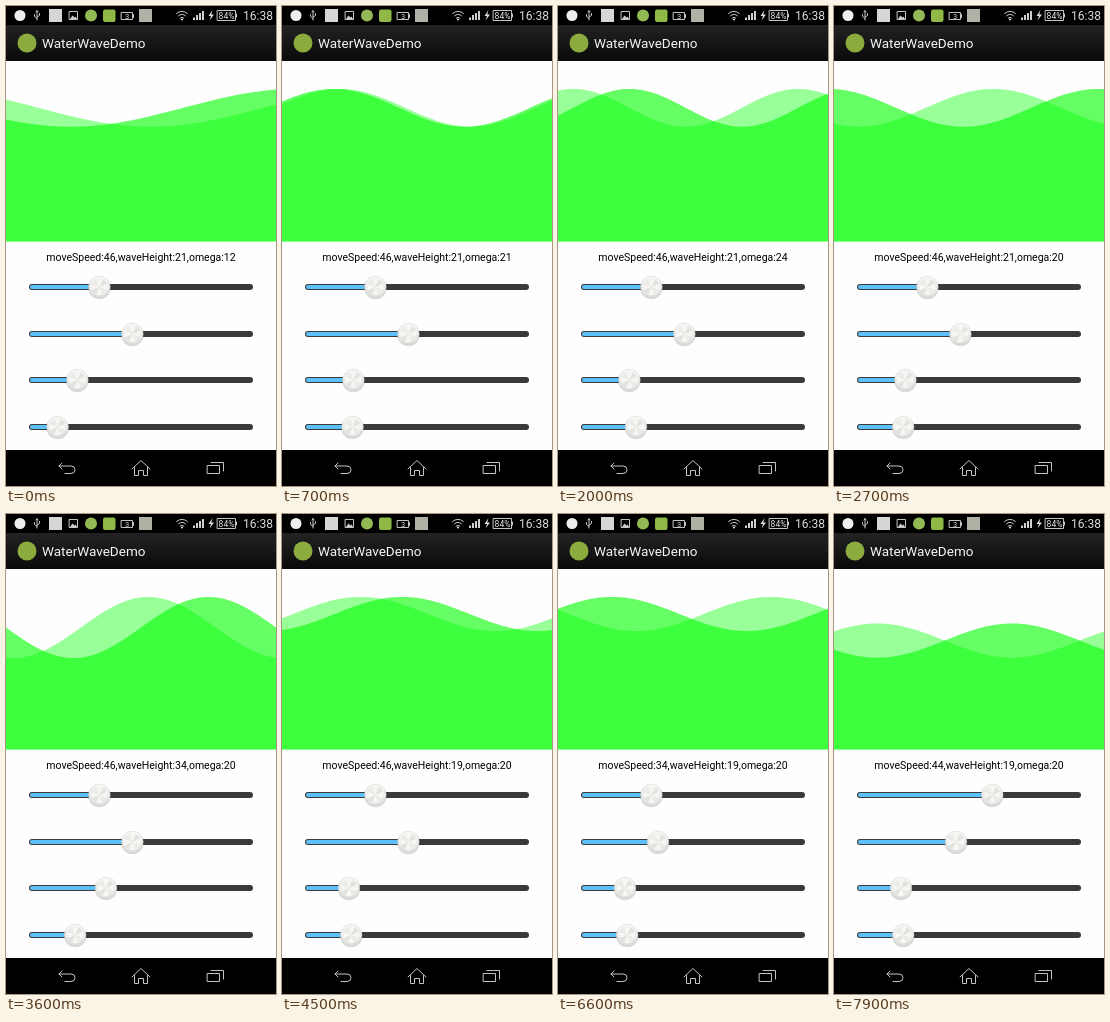
An HTML page for the animation above (8000 ms loop, 270 px wide and 480 px high).

```html
<!DOCTYPE html>
<html lang="en">
<head>
<meta charset="utf-8">
<title>Water wave</title>
<style>
  html, body { margin: 0; width: 100%; height: 100%; overflow: hidden; background: #fefefe; }
  svg { display: block; width: 270px; height: 480px; font-family: Roboto, sans-serif; }
  .line { fill: none; stroke: #c4c4c4; stroke-width: 1; stroke-linejoin: round; stroke-linecap: round; }
</style>
</head>
<body>
<svg viewBox="0 0 270 480" xmlns="http://www.w3.org/2000/svg">
  <defs>
    <linearGradient id="bar" x2="0" y2="1">
      <stop stop-color="#222"/><stop offset="1" stop-color="#0a0a0a"/>
    </linearGradient>
    <linearGradient id="metal" x2="0" y2="1">
      <stop stop-color="#f9f9f8"/><stop offset="1" stop-color="#dcdcda"/>
    </linearGradient>
    <g id="thumb">
      <circle cy="1" r="11.2" fill="#000" opacity=".14"/>
      <circle r="10.8" fill="url(#metal)" stroke="#cfcfcc" stroke-width=".5"/>
      <circle r="8.4" fill="#ebebe8"/>
      <path d="M0 0L-3 -8L3 -8ZM0 0L-3 8L3 8ZM0 0L8 -3L8 3ZM0 0L-8 -3L-8 3Z" fill="#f6f6f4"/>
      <path d="M0 0L4 -7.400L7.400 -4ZM0 0L-4 7.400L-7.400 4Z" fill="#e2e2df"/>
    </g>
  </defs>

  <rect width="270" height="480" fill="#fefefe"/>
  <path id="pale" fill="#0f0" fill-opacity=".4"/>
  <path id="deep" fill="#0f0" fill-opacity=".6"/>

  <rect width="270" height="19"/>
  <rect y="19" width="270" height="36" fill="url(#bar)"/>
  <circle cx="21" cy="37" r="9.5" fill="#8cab3e"/>
  <text x="36" y="42" font-size="13.5" fill="#f5f5f5">WaterWaveDemo</text>

  <!-- status icons -->
  <circle cx="14" cy="9.5" r="5.5" fill="#eee"/>
  <g class="line">
    <path d="M31 14V5M30 6L31 4.500L32 6M31 12.500L28.500 10.500V8.500M31 11L33.500 9.500V7.500"/>
    <path d="M63.500 5.500H71.500V13.500H63.500Z"/>
    <path d="M115.500 6.500H126.500V13.500H115.500ZM127.500 8.500V11.500"/>
    <path d="M170.500 7.500Q176 3 181.500 7.500M172.500 9.800Q176 6.800 179.500 9.800M174.300 12Q176 10.500 177.700 12"/>
    <path d="M211.500 4.500H229.500V14.500H211.500ZM230.500 8V11"/>
  </g>
  <path d="M64 13L66.500 9.500L68.500 11.500L69.500 10.500L71 13Z" fill="#ccc"/>
  <rect x="43" y="3" width="13" height="13" fill="#d6d6d6"/>
  <circle cx="85" cy="9.5" r="6" fill="#93b955"/>
  <rect x="97" y="3.500" width="12.500" height="12.500" rx="2" fill="#8fb846"/>
  <text x="119" y="12.700" font-size="7.500" fill="#ddd">3</text>
  <rect x="133" y="3" width="13" height="13" fill="#b0b1a4"/>
  <circle cx="176" cy="13.500" r="1.100" fill="#ccc"/>
  <path d="M187 14v-2.500h2v2.500zM190 14V9h2v5zM193 14V7h2v7zM196 14V5h2v9z" fill="#d0d0d0"/>
  <path d="M206.500 4L202.500 10H205L203.500 14.500L208 8.500H205.300Z" fill="#ddd"/>
  <text x="220.500" y="12.500" font-size="8.500" text-anchor="middle" fill="#e8e8e8">84%</text>
  <text x="237" y="14" font-size="12" fill="#dcdcdc">16:38</text>

  <text id="label" x="135" y="255" font-size="10.500" text-anchor="middle" fill="#000"></text>
  <g id="sliders"></g>

  <!-- navigation -->
  <rect y="444" width="270" height="36"/>
  <g class="line">
    <path d="M56 457L53 460L56 463M53 460H65Q69 460 69 463.700Q69 467.500 65 467.500H59"/>
    <path d="M126 463L135 454.500L144 463M128.500 461.500V469.500H132.500V464.500H137.500V469.500H141.500V461.500"/>
    <path d="M201.500 459.500H213.500V467.500H201.500ZM205 456.500H217.500V465"/>
  </g>
</svg>
<script>
  const LOOP = 8000, STEP = 100, WIDTH = 270, BOTTOM = 235.5;
  const get = id => document.getElementById(id);

  // Keys are [ms, value] pairs, joined by straight lines.
  const level = [[0, 31], [6900, 31], [7800, 60.5]];
  const speed = [[0, 46], [4500, 46], [5300, 66], [5600, 66], [6500, 34], [6600, 34], [7000, 44]];
  const height = [[0, 21], [2800, 21], [3500, 34], [3700, 34], [4500, 19]];
  const omega = [[0, 12], [1300, 28], [1500, 28], [2500, 20]];

  // Crest positions, counted in wavelengths.
  const times = [0, 1400, 2700, 3600, 5400, 6600, 7900];
  const track = turns => turns.map((v, i) => [times[i], v]);
  const deepTurns = track([.644, 1.75, 2.98, 3.75, 5.14, 6.2, 7.66]);
  const paleTurns = track([.822, 1.62, 2.59, 3.527, 5.055, 5.79, 7.16]);

  function at(keys, t) {
    const i = keys.findIndex(k => k[0] > t);
    if (i < 0) return keys[keys.length - 1][1];
    const [t0, a] = keys[i - 1], [t1, b] = keys[i];
    return a + (b - a) * (t - t0) / (t1 - t0);
  }

  function wave(top, amp, length, turns) {
    let d = `M0 ${BOTTOM}`;
    for (let x = 0; x <= WIDTH; x += 2) {
      const y = top + amp * (1 - Math.cos(2 * Math.PI * (x / length - turns)));
      d += `L${x} ${y.toFixed(2)}`;
    }
    return `${d}V${BOTTOM}Z`;
  }

  const settings = [level, speed, height, omega];
  get('sliders').innerHTML = settings.map((_, i) => `
    <g transform="translate(0 ${Math.round(281 + i * 46.6)})">
      <rect x="23" y="-3" width="224" height="6" rx="3" fill="#3a3a3a"/>
      <rect class="fill" x="24" y="-2" height="4" rx="2" fill="#5cc0fb"/>
      <use class="knob" href="#thumb"/>
    </g>`).join('');
  const fills = document.querySelectorAll('.fill');
  const knobs = document.querySelectorAll('.knob');

  function draw(t) {
    const values = settings.map(keys => at(keys, t));
    const [lift, move, high, freq] = values;
    const top = 55 + .9 * lift, amp = .9 * high, length = 5400 / freq;
    get('pale').setAttribute('d', wave(top, amp, length, at(paleTurns, t)));
    get('deep').setAttribute('d', wave(top, amp, length, at(deepTurns, t)));
    get('label').textContent =
      `moveSpeed:${Math.round(move)},waveHeight:${Math.round(high)},omega:${Math.round(freq)}`;
    values.forEach((v, i) => {
      const x = 25.2 + 2.2 * v;
      fills[i].setAttribute('width', x - 24);
      knobs[i].setAttribute('x', x);
    });
  }

  const start = performance.now();
  function tick(now) {
    const t = Math.max(0, now - start) % LOOP;
    draw(Math.floor(t / STEP) * STEP);
    requestAnimationFrame(tick);
  }
  draw(0);
  requestAnimationFrame(tick);
</script>
</body>
</html>
```
